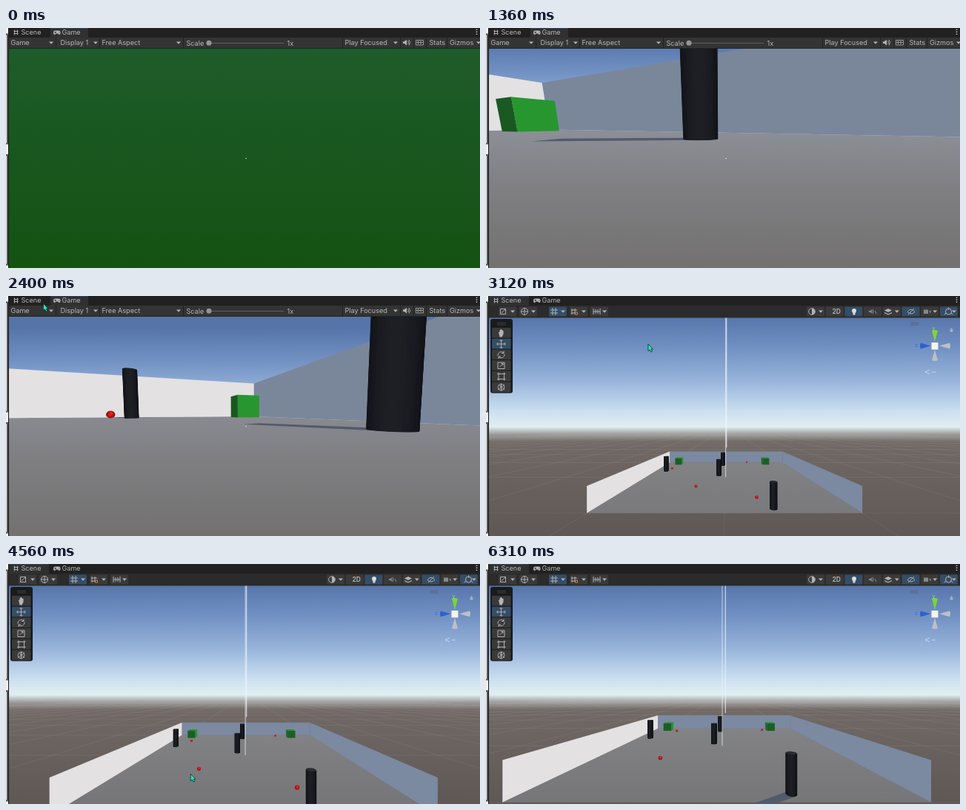
An HTML page with a canvas for the animation above (6.38 s loop, 640x325 px).

```html
<!DOCTYPE html>
<html lang="en">
<head>
<meta charset="utf-8">
<title>Game and scene views</title>
<style>
  html, body { margin: 0; width: 100%; height: 100%; overflow: hidden; background: #222; }
  #stage { position: relative; width: 640px; height: 325px; overflow: hidden; }
  canvas, svg { position: absolute; left: 0; top: 0; display: block; }
  text { font: 9.1px Inter, "Open Sans", sans-serif; fill: #b8b8b8; }
  .btn { fill: #3a3a3a; }
  .on { fill: #354d66; }
  .ico { fill: none; stroke: #b0b0b0; }
  .solid { fill: #b4b4b4; }
  .dim { fill: #888; }
  .sep { stroke: #222; }
</style>
</head>
<body>
<div id="stage">
<canvas id="view" width="640" height="325"></canvas>
<svg width="640" height="325" viewBox="0 0 640 325">
  <defs><path id="drop" class="solid" d="M-3-1.5h6l-3 3.3z"/></defs>
  <rect width="640" height="13" fill="#212121"/>
  <rect width="3" height="325" fill="#f1f1f1"/>
  <path d="M0 8.5H2V156.5H0M0 172H2V320.5H0" fill="none" stroke="#555" stroke-width="2"/>
  <path d="M3.5 0V325" stroke="#161616"/>

  <g id="game">
    <path d="M60 0h51v13H60z" fill="#303030"/>
    <path d="M60 .5h51" stroke="#28455f"/>
    <path d="M4 13h636v14H4z" fill="#343434"/>
    <path d="M4 27.5h636" stroke="#1d2420"/>
    <path class="sep" d="M67.5 13v14M126.5 13v14M239.5 13v14M454.5 13v14M532.5 13v14M550.5 13v14M567.5 13v14M595.5 13v14"/>
    <text x="6.5" y="23">Game</text>
    <text x="73.5" y="23">Display 1</text>
    <text x="129.5" y="23">Free Aspect</text>
    <text x="243.5" y="23.5">Scale</text>
    <path d="M274 20.5h101" stroke="#606060"/>
    <circle cx="274" cy="20.3" r="3.5" fill="#959595"/>
    <text x="379.5" y="23.5">1x</text>
    <text x="457.5" y="23">Play Focused</text>
    <text x="571.5" y="23">Stats</text>
    <text x="599" y="23">Gizmos</text>
    <use href="#drop" x="61" y="20"/><use href="#drop" x="121" y="20"/>
    <use href="#drop" x="233" y="20"/><use href="#drop" x="526" y="20"/><use href="#drop" x="638" y="20"/>
    <path class="solid" d="M536 18.3h2l3-2.6v8l-3-2.6h-2z"/>
    <path class="ico" d="M542.5 17.5q2 2.2 0 4.4M544 16q3 3.7 0 7.4"/>
    <path class="ico" opacity=".75" d="M553.5 16.5h10v6.5h-10zM554 19.5h9M556.5 17v5M560 17v5"/>
  </g>

  <g id="scene">
    <path d="M4 0h54v13H4z" fill="#303030"/>
    <path d="M4 .5h54" stroke="#28455f"/>
    <path d="M4 13h636v16.5H4z" fill="#2b2b2b"/>
    <g id="buttons"></g>
    <path class="ico" d="M19.5 17.5h7v7h-7zM21 23l5-5"/>
    <path class="ico" d="M47.5 21a4.5 4.5 0 1 0 9 0a4.5 4.5 0 1 0-9 0h9M52 16.5v9"/>
    <path class="ico" d="M90 16v10M94 16v10M87 19h10M87 23h10M116 17v8M120 17v8M115 19h8M115 23h5"/>
    <path d="M120.5 22h3v3h-3z" fill="none" stroke="#d08050"/>
    <path class="ico" d="M145 17v8M148 18v6M151 18v6M154 17v8M145 21h9"/>
    <circle class="ico" cx="440" cy="21" r="4.3"/>
    <path class="solid" d="M440 17a4 4 0 0 1 0 8z"/>
    <text x="467.5" y="24.2" style="font-size:8.5px;font-weight:600">2D</text>
    <path fill="#ddd" d="M494 20a3 3 0 1 1 6 0q0 2-1.5 3v2.5h-3V23Q494 22 494 20z"/>
    <path class="dim" d="M517 20h2l2-2v6l-2-2h-2z"/>
    <path class="ico" opacity=".7" d="M522.5 18v6M525 20l2 4"/>
    <path class="solid" d="M538 19.5l5-2.5 5 2.5-5 2.5zM538 22l5 2.3 5-2.3v1.2l-5 2.3-5-2.3z"/>
    <path class="ico" d="M569 21.5q5-6.5 10 0q-5 5-10 0M570 25l8-8"/>
    <path class="dim" d="M591 18.5h6v5.5h-6zM598 21l2.5-2v4.5z"/>
    <path class="ico" d="M620.5 21a4 4 0 1 0 8 0a4 4 0 1 0-8 0M624.5 15.5v3M618.5 25l3-2M630.5 25l-3-2"/>

    <rect x="6" y="31" width="30" height="100.5" rx="3" fill="#1a1b1d"/>
    <path d="M15 36.5h12M15 39h12" stroke="#444"/>
    <g id="tools"></g>
    <path class="solid" d="M17 49l1.5-.5V46h1.2v-1h1.3v1h1.3v1h1.2v4.5l-2 4h-3z"/>
    <path class="ico" d="M15 65h11M20.5 59.5v11M18.5 61l2-2 2 2M18.5 69l2 2 2-2M16.5 63l-2 2 2 2M24.5 63l2 2-2 2"/>
    <path class="ico" d="M16 81a4.7 4.7 0 0 1 8-4M25 78.5a4.7 4.7 0 0 1-8 4M24 74.5v3h-3M17 85v-3h3"/>
    <path class="ico" d="M16 90h9v8.5h-9zM18.5 96l4.5-4.5M20.5 91.5H23V94"/>
    <path class="ico" d="M17 105.5h7.5v7H17zM15 105.5h2v-2M26.5 105.5h-2v-2M15 112.5h2v2M26.5 112.5h-2v2"/>
    <circle class="ico" cx="20.5" cy="123.5" r="4.3"/>
    <path class="ico" d="M16 127l9-7M17 120l8 7M20.5 118.5v10"/>

    <path d="M573 36.5h11M573 39h11" stroke="#56647d"/>
    <path d="M602 47q4-2 8 0l-4 15z" fill="#7fd62c"/>
    <path d="M587 63.5q-2 4 0 8l13-4z" fill="#2f5fd0"/>
    <path d="M626 63.5q2 4 0 8l-14-4zM602 87q4 2 8 0l-4-14z" fill="#bcc0c6"/>
    <rect x="601.5" y="63" width="9" height="9.5" fill="#f4f4f4"/>
    <text x="602.5" y="45.5" style="font-size:7px;fill:#9be04a">y</text>
    <text x="579" y="69" style="font-size:7px;fill:#3b6be0">z</text>
    <path d="M626.5 45.5h4v3h-4zM627.5 45v-1.5h2V45" fill="#c5cfdf" opacity=".7"/>
    <path d="M599 100l-6 2.8 6 2.8M602 103h5" fill="none" stroke="#dce8f4" opacity=".7"/>
  </g>

  <path class="ico" d="M11.5 2.5v7M15.5 2.5v7M10.5 4.5h6M10.5 7.5h6"/>
  <text x="20.5" y="9.3">Scene</text>
  <path class="solid" d="M66.500 3.500h5q2 0 2 3t-2 2.500l-1.500-1.500h-2.200L66 9q-2 .5-2-2.500t2.500-3z"/>
  <path d="M65.500 6H68M66.700 4.800v2.500M71 6h1" stroke="#333" stroke-width=".9"/>
  <text x="75.500" y="9.300">Game</text>
  <path d="M635.500 1.500v8" stroke="#c8c8c8" stroke-width="1.500" stroke-dasharray="1.500"/>
  <path id="cursor" d="M0 0v9.500l2.200-1.700 1.600 3 1.700-.8-1.500-3h2.500z" fill="#2be5bd" stroke="#10302c" stroke-width=".8"/>
</svg>
</div>
<script>
const LOOP = 6380, STEP = LOOP / 80, OPEN_SCENE = 2550;
const FOCAL = 258, NEAR = 0.004, RAD = Math.PI / 180;
const EYE = .0105, BALL = .0075, PILLAR = .0132, CUBE = .0275;
const SUN = 30;                      // compass angle of the light, degrees
const spawn = [.291, .93], post = [.054, .759];

// time, yaw in degrees, downward pitch
const look = [[240, 0, .03], [720, 80.7, .21], [1760, 135, .147], [2400, 159, .067]];
// time, x, z, height
const fly = [[3120, .009, -.6935, .312], [4560, .009, -.4905, .311], [6310, .024, -.4456, .25]];
// time, x, y
const pointer = [[1600, 520, 250], [1760, 180, 30], [2400, 49.5, 10], [3120, 220.5, 65.5], [4560, 249.5, 286]];

const pillars = [[-.427, .677], [-.044, .549], [-.0245, .887], [.187, .039]];
const cubes = [[-.397, .93], [.333, .93]];
const resting = [[-.404, .644], [.266, .882]];
// x, z and speed per second
const rolling = [
  [-.399, .728, .025, .042], [-.152, .295, -.026, 0],
  [.138, .138, .025, -.001], [.182, .985, .0275, -.028]
];

const $ = id => document.getElementById(id);
const ctx = $('view').getContext('2d');
const mix = (a, b, k) => a.map((v, i) => v + (b[i] - v) * k);
const clamp = k => Math.min(1, Math.max(0, k));
let cam;

function sample(keys, t) {
  const i = Math.max(1, keys.findIndex(k => k[0] > t));
  const last = t >= keys[keys.length - 1][0];
  const [a, b] = last ? keys.slice(-2) : [keys[i - 1], keys[i]];
  return mix(a, b, clamp((t - a[0]) / (b[0] - a[0]))).slice(1);
}

function toCam([x, y, z]) {
  const dx = x - cam.x, dy = y - cam.y, dz = z - cam.z;
  const c = Math.cos(cam.yaw), s = Math.sin(cam.yaw);
  const cp = Math.cos(cam.pitch), sp = Math.sin(cam.pitch);
  const d = dx * c + dz * s;
  return [dx * s - dz * c, dy * cp + d * sp, d * cp - dy * sp];
}

const toScreen = ([r, u, d]) => [cam.cx + FOCAL * r / d, cam.cy - FOCAL * u / d];

function clip(pts) {
  const out = [];
  pts.forEach((a, i) => {
    const b = pts[(i + 1) % pts.length];
    if (a[2] >= NEAR) out.push(a);
    if ((a[2] >= NEAR) !== (b[2] >= NEAR)) out.push(mix(a, b, (NEAR - a[2]) / (b[2] - a[2])));
  });
  return out;
}

function poly(pts, fill, edge) {
  const p = clip(pts.map(toCam)).map(toScreen);
  if (p.length < 2) return;
  ctx.beginPath();
  p.forEach(([x, y]) => ctx.lineTo(x, y));
  ctx.closePath();
  if (fill) { ctx.fillStyle = fill; ctx.fill(); }
  if (edge) { ctx.strokeStyle = edge; ctx.stroke(); }
}

const flat = (y, pts, fill) => poly(pts.map(([x, z]) => [x, y, z]), fill);
const wall = (a, b, h, fill) =>
  poly([[a[0], 0, a[1]], [b[0], 0, b[1]], [b[0], h, b[1]], [a[0], h, a[1]]], fill);

function stops(g, list) {
  list.forEach(([k, c]) => g.addColorStop(k, c));
  return g;
}
const ramp = (y0, y1, ...list) => stops(ctx.createLinearGradient(0, y0, 0, y1), list);

function sky(h) {
  ctx.fillStyle = ramp(h - 160, h + 140,
    [0, '#5674a8'], [.14, '#7090c2'], [.3, '#9ab6dc'], [.43, '#cbdff0'],
    [.5, '#e0eff1'], [.535, '#9b9a98'], [.565, '#716965'], [1, '#5e5753']);
  ctx.fillRect(0, 0, 640, 325);
}

function grid() {
  ctx.lineWidth = 1;
  for (let i = -8; i <= 8; i += .5) {
    poly([[i, 0, -.4], [i, 0, 6]], null, 'rgba(205,205,205,.045)');
    poly([[-8, 0, i], [8, 0, i]], null, 'rgba(205,205,205,.035)');
  }
}

function room(inScene) {
  const h = inScene ? .099 : .103, blue = inScene ? '#7b89a1' : '#7a879b';
  const [nl, nr, fr, fl] = [[-.5, 0], [.5, 0], [.5, 1], [-.5, 1]];
  const floor = [nl, nr, fr, fl];
  flat(0, floor, inScene
    ? ramp(200, 325, [0, '#858689'], [1, '#767577'])
    : ramp(130, 325, [0, '#8e9199'], [.45, '#7f7f82'], [1, '#737170']));

  const turn = cam.yaw - SUN * RAD;
  if (!inScene && Math.cos(turn) > .1) {
    const x = cam.cx + FOCAL * Math.tan(turn);
    flat(0, floor, stops(ctx.createRadialGradient(x, 300, 0, x, 300, 400),
      [[0, 'rgba(190,182,170,.55)'], [1, 'rgba(190,182,170,0)']]));
  }
  wall(fl, fr, h, blue);
  wall(nr, fr, h, blue);
  wall(nl, fl, h, '#e3e1e2');
}

function shadow([x, z]) {
  if (toCam([x, 0, z])[2] > .5) return;
  const c = Math.cos(SUN * RAD), s = Math.sin(SUN * RAD), len = .109;
  const edge = (side, k) => [x - side * s * PILLAR - c * len * k, z + side * c * PILLAR - s * len * k];
  flat(0, [edge(1, 0), edge(1, 1), edge(-1, 1), edge(-1, 0)], '#525b6c');
}

function pillar([x, z]) {
  const h = .104, n = 40;
  const ring = Array.from({ length: n + 1 }, (_, i) => {
    const a = i / n * 2 * Math.PI;
    return [x + PILLAR * Math.cos(a), z + PILLAR * Math.sin(a)];
  });
  const toEye = Math.atan2(cam.z - z, cam.x - x);
  ctx.lineWidth = 1;
  for (let i = 0; i < n; i++) {
    const face = Math.cos((i + .5) / n * 2 * Math.PI - toEye);
    if (face < 0) continue;
    const l = 16 + 13 * face * face, c = `rgb(${l},${l + 2},${l + 7})`;
    const [a, b] = [ring[i], ring[i + 1]];
    poly([[a[0], 0, a[1]], [b[0], 0, b[1]], [b[0], h, b[1]], [a[0], h, a[1]]], c, face > .2 && c);
  }
  if (cam.y > h) flat(h, ring, '#2a2c30');
}

function cube([x, z], inScene) {
  const h = .053, [l, r, n, f] = [x - CUBE, x + CUBE, z - CUBE, z + CUBE];
  const shade = inScene ? '#1b5f22' : ramp(27, 325, [0, '#1f5c2b'], [.35, '#1a5822'], [1, '#145212']);
  if (cam.x > r) wall([r, n], [r, f], h, '#27962f');
  if (cam.x < l) wall([l, n], [l, f], h, shade);
  if (cam.z < n) wall([l, n], [r, n], h, shade);
  if (cam.y > h) flat(h, [[l, n], [r, n], [r, f], [l, f]], '#2a8c31');
}

function ball([x, z]) {
  const p = toCam([x, BALL, z]);
  if (p[2] < .03) return;
  const [sx, sy] = toScreen(p), r = FOCAL * BALL / p[2];
  ctx.fillStyle = stops(ctx.createRadialGradient(sx + r * .2, sy - r * .45, 0, sx, sy, r),
    [[0, '#f22a22'], [.6, '#d01414'], [1, '#850d0d']]);
  ctx.beginPath();
  ctx.ellipse(sx, sy, r * Math.hypot(1, p[0] / p[2]), r, 0, 0, 7);
  ctx.fill();
}

function mast(z, alpha) {
  const [x, y] = toScreen(toCam([0, 0, z]));
  ctx.fillStyle = `rgba(240,246,255,${alpha})`;
  ctx.fillRect(x - .6, 29, 1.2, y - 29);
}

function draw(t) {
  const inScene = t >= OPEN_SCENE;
  if (inScene) {
    const [x, z, y] = sample(fly, t);
    cam = { x, y, z, yaw: Math.PI / 2, pitch: 0, cx: 325.5, cy: 178 };
    sky(187);
    grid();
  } else {
    const [x, z] = mix(spawn, post, clamp((t - 240) / 480));
    const [yaw, pitch] = sample(look, t);
    cam = { x, y: EYE, z, yaw: yaw * RAD, pitch, cx: 324, cy: 176 };
    sky(221 - FOCAL * Math.tan(pitch));
  }
  room(inScene);
  pillars.forEach(shadow);

  const s = (t - 3120) / 1000;
  const balls = inScene ? rolling.map(([x, z, vx, vz]) => [x + vx * s, z + vz * s]) : resting;
  [[cube, cubes], [pillar, pillars], [ball, balls]]
    .flatMap(([paint, list]) => list.map(p => ({ paint, p, d: toCam([p[0], 0, p[1]])[2] })))
    .sort((a, b) => b.d - a.d)
    .forEach(o => o.paint(o.p, inScene));

  if (inScene) {
    mast(2.27, .75);
    mast(.5, .6);
  } else {
    ctx.fillStyle = '#fff';
    ctx.fillRect(323.5, 176, 1.2, 1.2);
  }

  $('game').style.display = inScene ? 'none' : '';
  $('scene').style.display = inScene ? '' : 'none';
  $('cursor').style.display = t >= 1600 && t < 4720 ? '' : 'none';
  $('cursor').setAttribute('transform', `translate(${sample(pointer, t)})`);
}

const box = (x, y, w, h, on) =>
  `<rect x="${x}" y="${y}" width="${w}" height="${h}" rx="1" class="${on ? 'on' : 'btn'}"/>`;
const button = (x, on, drop) =>
  box(x, 14.5, 24, 13, on) + (drop ? `<use href="#drop" x="${x + 19}" y="21"/>` : '');
const repeat = (n, make) => Array.from({ length: n }, (_, i) => make(i)).join('');

$('buttons').innerHTML =
  repeat(5, i => button(17 + 28 * i + (i > 1 ? 12 : 0), i === 2, true)) +
  repeat(8, i => button(433 + 25.7 * i, i === 2 || i === 5 || i === 7, i % 4 === 0 || i > 5));
$('tools').innerHTML = repeat(6, i => box(8, 43 + i * 14.7, 25.5, 13.7, i === 1));

function tick() {
  const t = performance.now() % LOOP;
  draw(Math.floor(t / STEP) * STEP + 3);
  requestAnimationFrame(tick);
}
tick();
</script>
</body>
</html>
```
